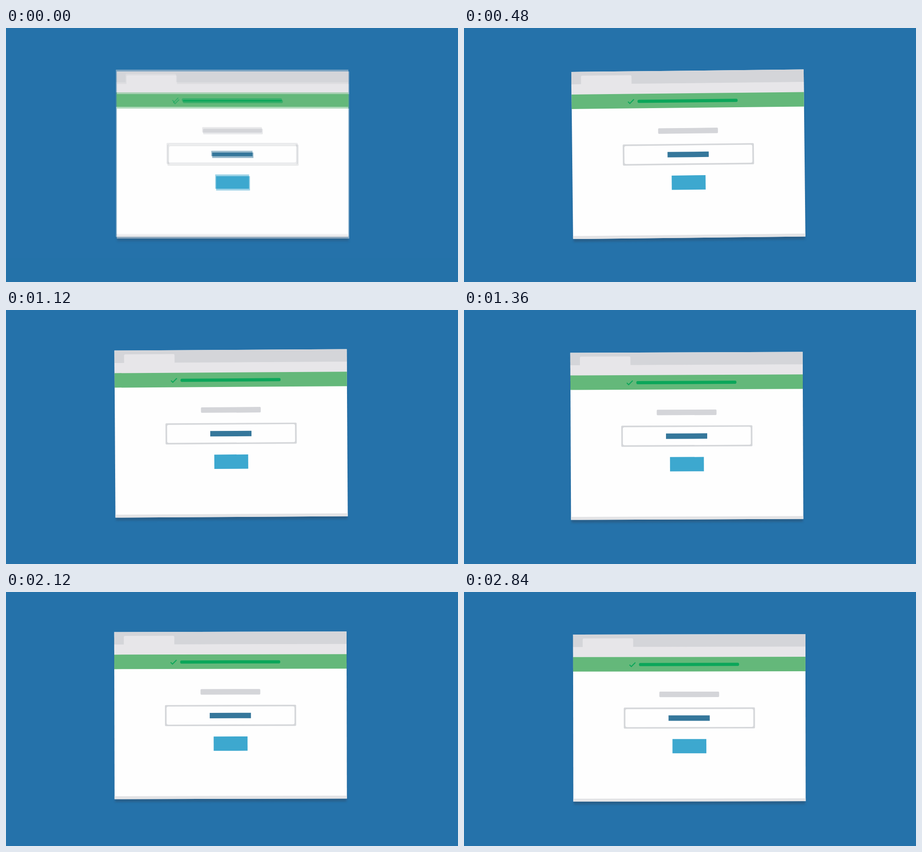
Animation of 998 by 561 pixels, one loop 2.88 s. Source, as an HTML page:

```html
<!DOCTYPE html>
<html lang="en">
<head>
<meta charset="utf-8">
<title>Shaking browser window</title>
<style>
  html, body { margin: 0; width: 100%; height: 100%; overflow: hidden; background: #2572aa; }
  svg { display: block; width: 100%; height: 100%; }
</style>
</head>
<body>
<svg viewBox="0 0 998 561">
  <defs>
    <filter id="soft" x="-5%" y="-5%" width="110%" height="110%">
      <feGaussianBlur stdDeviation="2"/>
    </filter>
    <!-- Window drawn around its own centre -->
    <g id="window">
      <rect x="-255.5" y="-177" width="511" height="368" fill="#2b567c" opacity=".65" filter="url(#soft)"/>
      <rect x="-256.5" y="-184.5" width="513" height="369" fill="#fefefe"/>
      <rect x="-256.5" y="-184.5" width="513" height="28" fill="#d4d5d9"/>
      <rect x="-256.5" y="-157" width="513" height="23" fill="#e7e6e9"/>
      <rect x="-235.3" y="-176" width="111.5" height="25" rx="3" fill="#e7e6e9"/>
      <rect x="-256.5" y="-134.6" width="513" height="32" fill="#64b87a"/>
      <path d="M-132 -117.5 L-128 -113.5 L-119 -122.5" fill="none" stroke="#0ba65a" stroke-width="2.2"/>
      <rect x="-111" y="-121.5" width="221" height="7" rx="3" fill="#0ba65a"/>
      <rect x="-66.2" y="-58" width="132" height="12.2" rx="2" fill="#d4d5d9"/>
      <rect x="-144.8" y="-23" width="289.6" height="46.6" rx="2" fill="#d5d7da"/>
      <rect x="-141.2" y="-19.6" width="282.4" height="39.8" rx="3.5" fill="#fefefe"/>
      <rect x="-46" y="-5.5" width="91" height="12" fill="#35779b"/>
      <rect x="-37.4" y="46.7" width="74.8" height="31.6" fill="#3da8cf"/>
      <rect x="-256.5" y="178" width="513" height="6.5" fill="#e4e4e6"/>
    </g>
  </defs>
  <rect width="998" height="561" fill="#2572aa"/>
  <use id="main" href="#window"/>
  <g id="ghost" opacity=".5">
    <rect width="998" height="561" fill="#2572aa"/>
    <use href="#window" transform="translate(501.3 280.6)"/>
  </g>
</svg>
<script>
const LOOP = 2880, STEP = 40;
const main = document.getElementById("main");
const ghost = document.getElementById("ghost");

// time, centre x, centre y, angle in degrees
const poses = [
  [0, 499.3, 276.7, 0],
  [240, 502.5, 275, -0.35],
  [480, 495.4, 278.8, -0.61],
  [680, 490.5, 281, -0.58],
  [880, 501.8, 279, -0.5],
  [1120, 497, 272.5, -0.35],
  [1360, 492, 278, -0.25],
  [1680, 506.1, 269.1, -0.24],
  [1900, 493, 277, -0.18],
  [2120, 495.8, 272.4, -0.13],
  [2340, 505, 269, -0.12],
  [2580, 496, 282, -0.1],
  [2780, 494.5, 272.5, -0.1],
  [2840, 497.6, 278, -0.1]
];

function poseAt(index) {
  const n = poses.length, turn = Math.floor(index / n);
  const [t, ...values] = poses[index - turn * n];
  return [t + turn * LOOP, ...values];
}

// Smooth periodic curve through the poses
function interpolate(time) {
  const i = poses.findLastIndex(p => p[0] <= time);
  const [a, b, c, d] = [-1, 0, 1, 2].map(k => poseAt(i + k));
  const span = c[0] - b[0], u = (time - b[0]) / span;
  return [1, 2, 3].map(k => {
    const m0 = (c[k] - a[k]) / (c[0] - a[0]) * span;
    const m1 = (d[k] - b[k]) / (d[0] - b[0]) * span;
    const delta = c[k] - b[k];
    return b[k] + u * (m0 + u * (3 * delta - 2 * m0 - m1 + u * (m0 + m1 - 2 * delta)));
  });
}

function draw() {
  const time = Math.floor(performance.now() % LOOP / STEP) * STEP;
  const [x, y, angle] = interpolate(time);
  main.setAttribute("transform", `translate(${x} ${y}) rotate(${angle})`);
  ghost.style.display = time === 0 ? "" : "none";
  requestAnimationFrame(draw);
}
draw();
</script>
</body>
</html>
```
